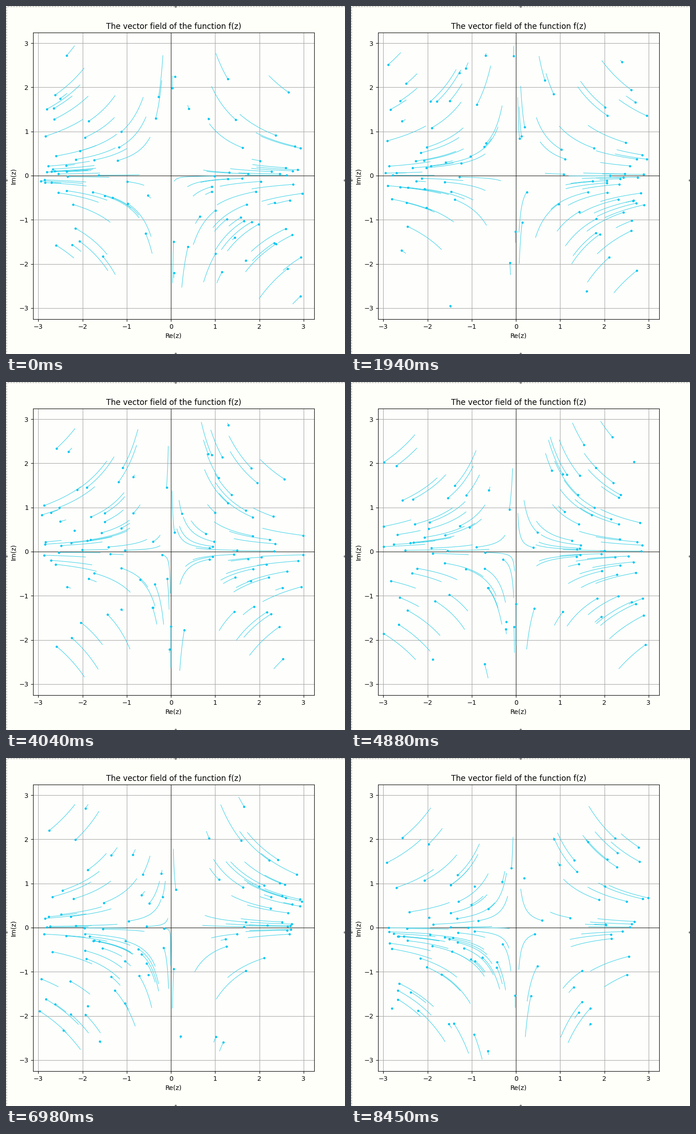
A matplotlib script for the animation above (8.48 s loop, 738x759 px).

```python
import numpy as np
import matplotlib.pyplot as plt
from matplotlib.animation import FuncAnimation
from matplotlib.collections import LineCollection
from matplotlib.lines import Line2D
from matplotlib.patches import Rectangle
from matplotlib.transforms import IdentityTransform

W, H, DPI = 738, 759, 100
LOOP, TICK = 8480, 20
POSES = 183
COUNT = 100       # points in the field
STEP = 0.028      # distance travelled per pose
TRAIL = 0.94      # longest trail
LIMIT = 3
WARM_UP = 300     # steps run before the loop opens

# Plot box and origin in pixels from the top left, and pixels per unit
LEFT, RIGHT, TOP, BOTTOM = 59, 671.2, 58.2, 683
X0, Y0, UNIT = 359, 370, 96.25


def flow(p, h):
    """Follow the unit field (x, -y)/|z| over a distance h (midpoint rule)."""
    def field(q):
        v = q * (1, -1)
        return v / (np.hypot(q[:, :1], q[:, 1:]) + 1e-9)
    return p + h * field(p + h / 2 * field(p))


def trails(pos, age, n=24):
    """Trace every point back along its streamline."""
    h = -np.minimum(age, TRAIL)[:, None] / n
    pts = [pos]
    for _ in range(n):
        pts.append(flow(pts[-1], h))
    return np.stack(pts, axis=1)


def simulate():
    """Points drift outwards and are reborn anywhere once they leave."""
    rng = np.random.default_rng(7)
    pos = rng.uniform(-LIMIT, LIMIT, (COUNT, 2))
    age = np.zeros(COUNT)
    poses = []
    for step in range(WARM_UP + POSES):
        if step >= WARM_UP:
            poses.append((pos, trails(pos, age)))
        pos, age = flow(pos, STEP), age + STEP
        gone = np.abs(pos[:, 0]) > LIMIT
        pos[gone] = rng.uniform(-LIMIT, LIMIT, (gone.sum(), 2))
        age[gone] = 0
    return poses


def pose_starts():
    """Poses hold 20, 20, 100 ms in turn; the last two are cut short."""
    n = np.arange(1, POSES + 1)
    t = 140 * (n // 3) + 20 * (n % 3) - 20
    t[-1] = LOOP - 30
    return t


poses = simulate()
starts = pose_starts()

plt.rcParams.update({"font.family": "DejaVu Sans", "font.size": 10.1})
fig = plt.figure(figsize=(W / DPI, H / DPI), dpi=DPI, facecolor="#fffffa")
ax = fig.add_axes([LEFT / W, 1 - BOTTOM / H, (RIGHT - LEFT) / W, (BOTTOM - TOP) / H],
                  facecolor="#fefefc")
ax.set(xlim=((LEFT - X0) / UNIT, (RIGHT - X0) / UNIT),
       ylim=((Y0 - BOTTOM) / UNIT, (Y0 - TOP) / UNIT),
       xticks=range(-3, 4), yticks=range(-3, 4),
       xlabel="Re(z)", ylabel="Im(z)")
ax.set_title("The vector field of the function f(z)", fontsize=12.2)
ax.grid(color="#a6a6a6", lw=0.8)
ax.set_axisbelow(True)
ax.axhline(0, color="#20201c", lw=0.8, zorder=1.5)
ax.axvline(0, color="#20201c", lw=0.8, zorder=1.5)

# Dashed selection frame with its four handles
px = IdentityTransform()
fig.add_artist(Rectangle((0.5, 0.5), W - 1, H - 1, fill=False, ec="#8a8a8a",
                         lw=0.72, ls=(0, (4, 2)), transform=px))
fig.add_artist(Line2D([W / 2, W / 2, 1, W - 1], [1, H - 1, H / 2, H / 2], ls="",
                      marker="o", ms=3.4, mew=0, color="#808080", transform=px))

lines = LineCollection([], colors="#35d0e8", linewidths=0.75, zorder=2)
ax.add_collection(lines, autolim=False)
dots, = ax.plot([], [], "o", color="#08c8f2", ms=3.6, mew=0, zorder=3)


def draw(i):
    k = np.searchsorted(starts, i * TICK + TICK / 2, side="right") - 1
    pos, paths = poses[k]
    lines.set_segments(paths)
    dots.set_data(pos[:, 0], pos[:, 1])
    return lines, dots


anim = FuncAnimation(fig, draw, frames=LOOP // TICK, interval=TICK,
                     repeat=True, repeat_delay=0, blit=False)
plt.show()
```
